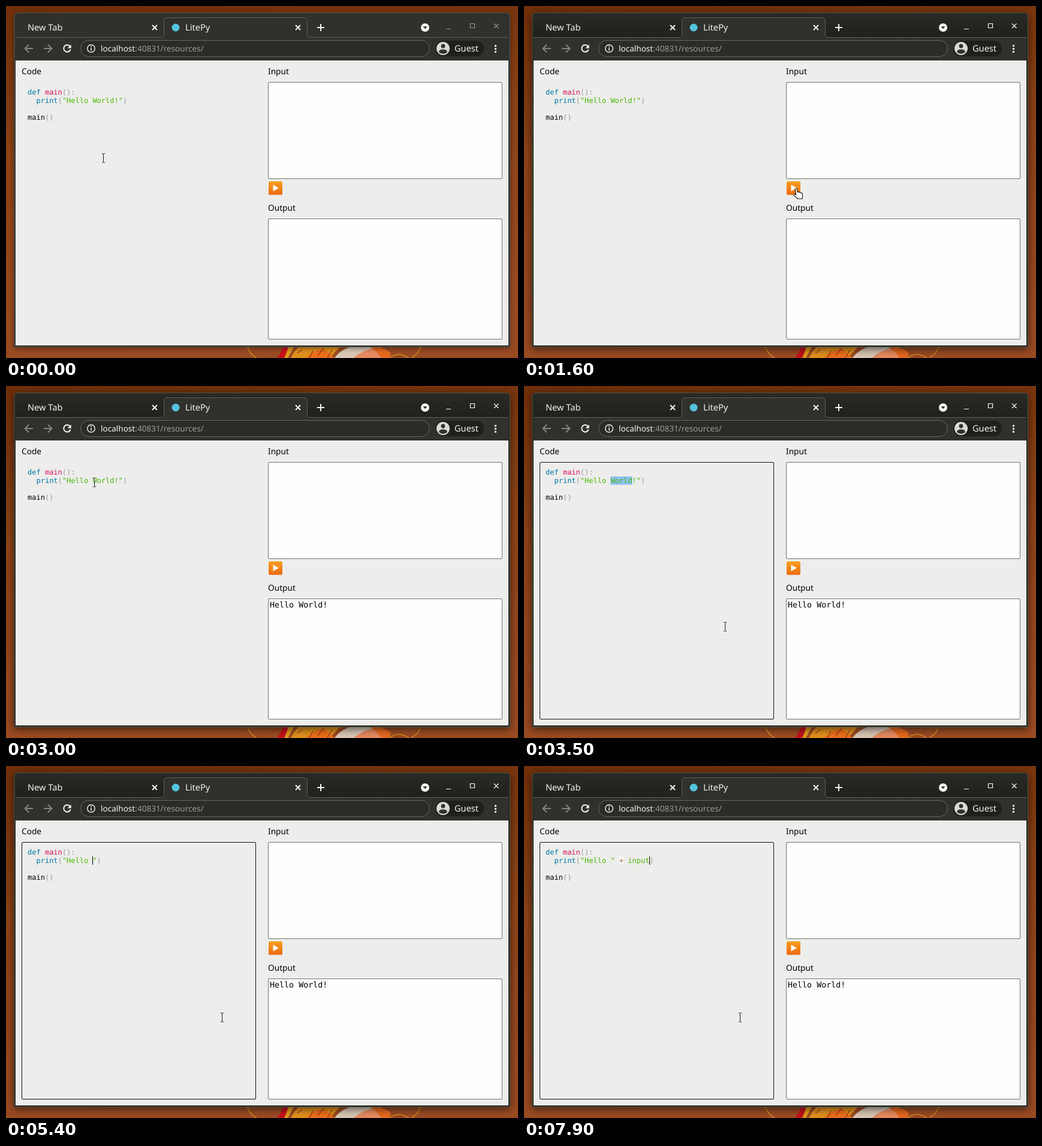
Animation, 854 px wide and 588 px high, one loop 8 s. Source, as an HTML page:

```html
<!DOCTYPE html>
<html lang="en">
<head>
<meta charset="utf-8">
<title>LitePy</title>
<style>
  html, body { margin: 0; width: 100%; height: 100%; overflow: hidden; background: #8a4218; }
  svg { display: block; width: 854px; height: 588px; }
  text { font-family: "Noto Sans", "Open Sans", sans-serif; text-rendering: geometricPrecision; white-space: pre; }
  .tab { font-size: 14.6px; fill: #f3f3ee; }
  .url { font-size: 13.55px; fill: #f5f5f0; }
  .label { font-size: 13.7px; fill: #000; }
  .mono { font-family: "DejaVu Sans Mono", monospace; font-size: 12px; fill: #000; }
  .out { font-size: 13.333px; }
  .kw { fill: #07a; }
  .fn { fill: #d6105f; }
  .str { fill: #4cb80a; }
  .pn { fill: #999; }
  .op { fill: #9a6e3a; }
  .line { fill: none; stroke: #f5f5f0; stroke-width: 2; }
  .dim { stroke: #85857f; }
  .box { fill: #fefefc; stroke: #74746f; }
  #frame { fill: #30312c; filter: drop-shadow(0 2px 4px rgba(0,0,0,.45)); }
  #bar { fill: #30302c; }
  #buttons { fill: none; stroke: #92928c; stroke-width: 1.2; }
  .focus #frame { fill: #25261f; filter: drop-shadow(0 3px 7px rgba(0,0,0,.6)); }
  .focus #bar { fill: url(#title); }
  .focus #buttons { stroke: #fbfbf6; }
</style>
</head>
<body>
<svg id="stage" viewBox="0 0 854 588">
  <defs>
    <linearGradient id="wall" x1="0" y1="0" x2=".15" y2="1">
      <stop offset="0" stop-color="#6f2f09"/>
      <stop offset=".45" stop-color="#8d4216"/>
      <stop offset="1" stop-color="#9b4b22"/>
    </linearGradient>
    <linearGradient id="title" x1="0" y1="0" x2="0" y2="1">
      <stop offset="0" stop-color="#292a25"/>
      <stop offset="1" stop-color="#20211d"/>
    </linearGradient>
    <linearGradient id="play" x1="0" y1="0" x2="0" y2="1">
      <stop offset="0" stop-color="#fa9f1e"/>
      <stop offset="1" stop-color="#ec6a12"/>
    </linearGradient>
  </defs>

  <!-- wallpaper -->
  <rect width="854" height="588" fill="url(#wall)"/>
  <g fill="none" stroke="#a8592a" stroke-opacity=".35">
    <path d="M0 215Q14 250 0 290M0 228Q8 252 0 276M842 270Q850 230 854 215M842 120Q848 150 854 160"/>
  </g>
  <path d="M458 588L467 566H482L470 588Z" fill="#e09a1c"/>
  <path d="M452 588Q460 578 463 566H472Q468 580 464 588Z" fill="#c4121c"/>
  <path d="M475 588Q482 574 492 566H560L540 588Z" fill="#e0901e"/>
  <path d="M500 588Q512 576 530 572L548 588Z" fill="#ec6e1a"/>
  <path d="M548 588Q560 570 590 566H606Q626 574 630 588Z" fill="#d9c6b4"/>
  <path d="M580 588Q596 574 614 572L642 588Z" fill="#e58a60"/>
  <path d="M600 566Q630 568 642 580L640 588H626Q618 574 600 566Z" fill="#e4691f"/>
  <path d="M486 580l8-6M506 588l6-12M520 584l10-12M536 588l8-14" stroke="#a8401a" stroke-width="1.5"/>
  <path d="M403 570Q406 581 418 588M640 588Q654 576 672 588M691 568Q690 581 676 587" fill="none" stroke="#d28a22" stroke-width="1.6"/>

  <!-- window -->
  <path id="frame" d="M13.5 570V18Q13.5 11 20 11H834Q841 11 841 18V570Z"/>
  <path id="bar" d="M16 53V18Q16 12 22 12H832Q838 12 838 18V53Z"/>
  <path d="M14 18Q14 11.5 20 11.5H834Q840.5 11.5 840.5 18V569.5H14Z" fill="none" stroke="#5e6660" stroke-opacity=".75"/>
  <path d="M16 52.5H258Q263.5 52.5 263.5 47V25Q263.5 19.5 269 19.5H497Q502.5 19.5 502.5 25V47Q502.5 52.5 508 52.5H838V91H16Z" fill="#30312c"/>
  <path d="M16 52.5H258Q263.5 52.5 263.5 47V25Q263.5 19.5 269 19.5H497Q502.5 19.5 502.5 25V47Q502.5 52.5 508 52.5H838" fill="none" stroke="#5d5e57"/>
  <rect x="16" y="91" width="822" height="476" fill="#ededeb"/>

  <!-- tabs -->
  <text class="tab" x="36" y="41">New Tab</text>
  <text class="tab" x="299" y="41">LitePy</text>
  <circle cx="283" cy="36" r="6.5" fill="#55c3dd"/>
  <path class="line" stroke-width="1.7" d="M244 32l8 8m0-8l-8 8M483 32l8 8m0-8l-8 8"/>
  <path class="line" d="M525 30v12M519 36h12"/>
  <circle cx="699" cy="36" r="7" fill="#f8f8f3"/>
  <path d="M695.5 34.3h7l-3.5 4Z" fill="#23241f"/>
  <path id="buttons" d="M734 38.5H742M774.5 29.5h7v7h-7ZM814 29.5l7.5 7.5m0-7.5l-7.5 7.5"/>

  <!-- toolbar -->
  <path class="line dim" stroke-width="1.8" d="M45 71H32M38 64.5L31.7 71L38 77.5M63 71H76M70 64.5L76.3 71L70 77.5"/>
  <path class="line" d="M106.6 67.2A5.8 5.8 0 1 0 107.6 72.6"/>
  <path d="M108.6 64.4V70.4H102.6Z" fill="#f5f5f0"/>
  <rect x="124.5" y="57.5" width="582" height="27" rx="13.5" fill="#2b2c28" stroke="#67685f"/>
  <circle cx="142" cy="71" r="6.3" fill="none" stroke="#f0f0eb" stroke-width="1.4"/>
  <path d="M142 67v1.7M142 70v4.5" stroke="#f0f0eb" stroke-width="1.6"/>
  <text class="url" x="158" y="76">localhost<tspan fill="#9b9b95">:40831/resources/</tspan></text>
  <rect x="716" y="58" width="81" height="26" rx="13" fill="#1f201c"/>
  <circle cx="729" cy="71" r="11" fill="#d9dad5"/>
  <circle cx="729" cy="67" r="3.4" fill="#30312c"/>
  <path d="M722 77Q722.5 72.6 729 72.6T736 77Q733 80 729 80T722 77Z" fill="#30312c"/>
  <text class="tab" x="748" y="76">Guest</text>
  <g fill="#f5f5f0"><circle cx="816.5" cy="66.5" r="1.7"/><circle cx="816.5" cy="71.5" r="1.7"/><circle cx="816.5" cy="76.5" r="1.7"/></g>

  <!-- page -->
  <text class="label" x="26" y="114">Code</text>
  <text class="label" x="437" y="114">Input</text>
  <text class="label" x="437" y="342">Output</text>
  <rect class="box" x="437.5" y="127.5" width="390" height="161" rx="1.5"/>
  <rect class="box" x="437.5" y="355.5" width="390" height="201" rx="1.5"/>
  <rect x="438" y="293" width="23" height="22.5" rx="2" fill="url(#play)"/>
  <path d="M445.5 298.5V309.5L455 304Z" fill="#fdfdfa"/>
  <text id="result" class="mono out" x="440" y="370">Hello World!</text>

  <!-- editor -->
  <rect id="ring" x="26.5" y="127.5" width="390" height="429" rx="1.5" fill="none" stroke="#101010"/>
  <rect id="select" y="151" height="14" fill="#8fc3f6"/>
  <rect id="opback" y="151" height="14" fill="#fff" fill-opacity=".5"/>
  <text class="mono" x="36" y="148"><tspan class="kw">def</tspan> <tspan class="fn">main</tspan><tspan class="pn">():</tspan></text>
  <text id="code" class="mono" x="36" y="162"></text>
  <text class="mono" x="36" y="190">main<tspan class="pn">()</tspan></text>
  <rect id="caret" y="151" width="1" height="14" fill="#000"/>

  <!-- pointers -->
  <g id="beam">
    <path id="beamShape" d="M-2 -7.5H0M1 -7.5H3M.5 -7V7M-2 7.5H0M1 7.5H3" fill="none" stroke="#fff" stroke-opacity=".75" stroke-width="2.6"/>
    <path d="M-2 -7.5H0M1 -7.5H3M.5 -7V7M-2 7.5H0M1 7.5H3" fill="none" stroke="#111"/>
  </g>
  <path id="hand" fill="#fff" stroke="#111" stroke-width="1.1" stroke-linejoin="round"
    d="M3.3 2.4C3.2 .7 5.8 .4 6.2 2L7.2 6.9C8 6 9.6 6.2 9.9 7.3C10.8 6.6 12.3 6.9 12.6 8C13.8 7.6 15 8.3 15.2 9.7L15.6 13C15.7 15 15 16.3 15 18H7.4C6.5 16 3.5 14.4 1.2 12.4C.2 11 1.6 9.8 3 10.6L4.9 11.6Z"/>
</svg>
<script>
const LOOP = 8000, LEFT = 36, ADV = 12 * 1233 / 2048;
const $ = id => document.getElementById(id);
const colX = col => LEFT + col * ADV;

// time, x, y, pointer
const moves = [
  [0, 162, 254, "beam"], [300, 161, 253, "beam"],
  [600, 180, 256, "beam"], [700, 252, 270, "beam"], [800, 340, 288, "beam"],
  [900, 405, 301, "beam"], [1000, 449, 304, "hand"],
  [2200, 448, 306, "hand"], [2300, 440, 300, "hand"], [2400, 405, 290, "beam"],
  [2500, 345, 262, "beam"], [2600, 280, 230, "beam"], [2700, 220, 199, "beam"],
  [2800, 177, 176, "beam"], [2900, 155, 165, "beam"], [3000, 147, 161, "beam"],
  [3500, 335, 402, "beam"], [3600, 360, 420, "beam"]
];

// time, line with | as the caret
const edits = [
  [0, 'print("Hello World!")'],
  [4100, 'print("Hello |!")'],
  [4500, 'print("Hello !|")'],
  [4900, 'print("Hello |")'],
  [5100, 'print("Hello|")'],
  [5400, 'print("Hello |")'],
  [6100, 'print("Hello "|)'],
  [6200, 'print("Hello " |)'],
  [6300, 'print("Hello " +|)'],
  [6500, 'print("Hello " + |)'],
  [7100, 'print("Hello " + i|)'],
  [7300, 'print("Hello " + in|)'],
  [7500, 'print("Hello " + inp|)'],
  [7700, 'print("Hello " + inpu|)'],
  [7900, 'print("Hello " + input|)']
];

const at = (table, t) => table.reduce((hit, row) => row[0] <= t ? row : hit);
const show = (id, on) => { $(id).style.display = on ? "" : "none"; };
const place = (id, col, cols) => {
  $(id).setAttribute("x", colX(col));
  $(id).setAttribute("width", cols * ADV);
};

function kind(token) {
  if (/^"|^input$/.test(token)) return "str";
  if (/^(print|in)$/.test(token)) return "kw";
  return token === "+" ? "op" : "pn";
}

function highlight(line) {
  return line.replace(/"[^"]*"|\b(?:print|input|in)\b|[()+]/g,
    token => `<tspan class="${kind(token)}">${token}</tspan>`);
}

let shown;
function drawCode(row) {
  if (row === shown) return;
  shown = row;
  const caret = row[1].indexOf("|");
  const line = "  " + row[1].replace("|", "");
  $("code").innerHTML = highlight(line);
  show("caret", caret >= 0);
  $("caret").setAttribute("x", Math.floor(colX(caret + 2)));
  const plus = line.indexOf("+");
  show("opback", plus >= 0);
  place("opback", plus, 1);
}

function draw(t) {
  const [, x, y, pointer] = at(moves, t);
  for (const id of ["beam", "hand"]) {
    show(id, id === pointer);
    $(id).setAttribute("transform", `translate(${x} ${y})`);
  }
  $("stage").classList.toggle("focus", t >= 1600);
  show("result", t >= 1800);
  show("ring", t >= 3100);
  show("select", t >= 3100 && t < 4100);
  drawCode(at(edits, t));
}

place("select", 15, 5);
const start = performance.now();
function tick() {
  draw((performance.now() - start) % LOOP);
  requestAnimationFrame(tick);
}
tick();
</script>
</body>
</html>
```
